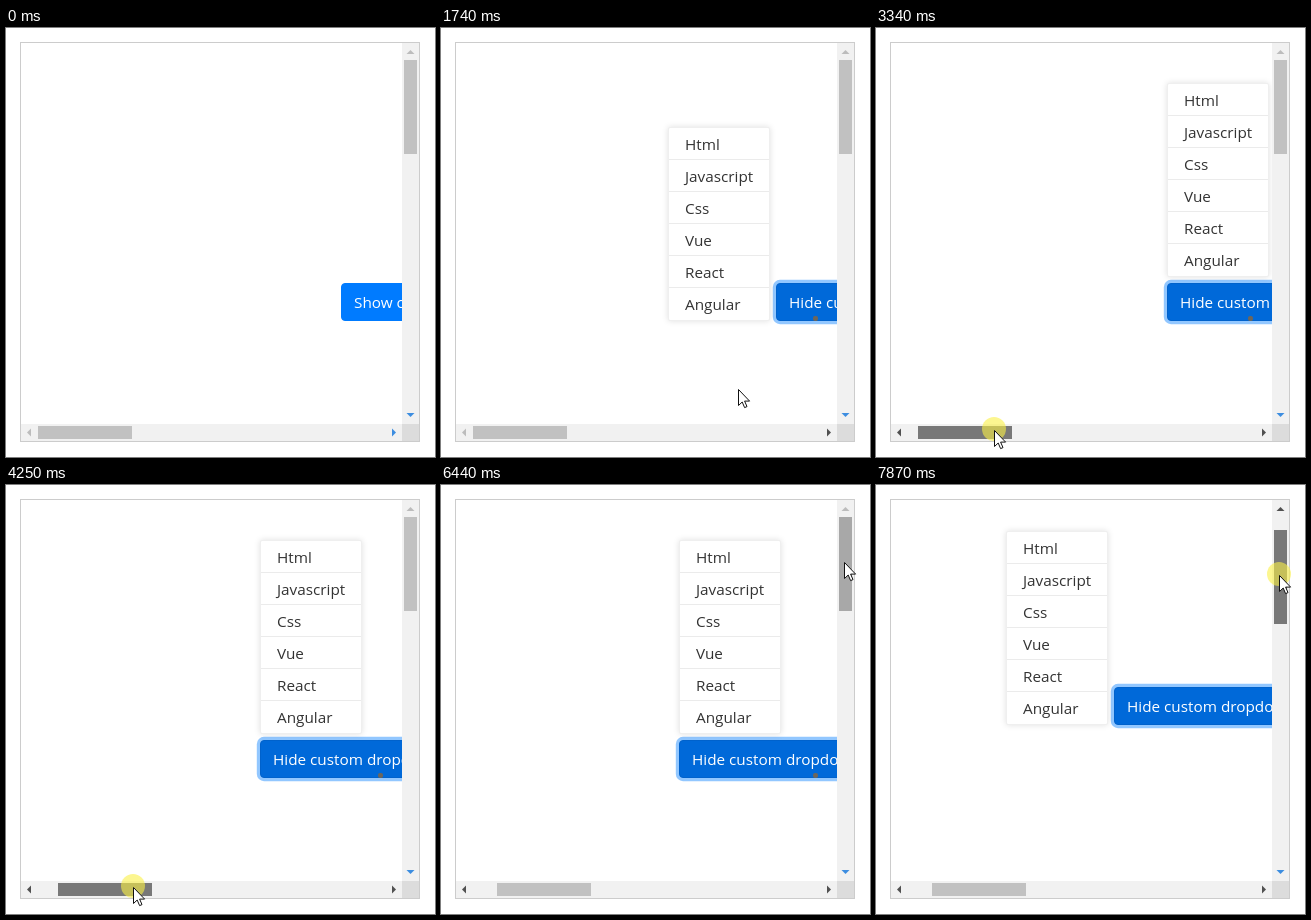
These frames come from a looping animation (429 by 429 pixels, 8 s). An HTML page:

```html
<!DOCTYPE html>
<html lang="en">
<head>
<meta charset="utf-8">
<title>Custom dropdown</title>
<style>
html, body { margin: 0; width: 100%; height: 100%; overflow: hidden; background: #fff; }
#stage { position: relative; width: 429px; height: 429px; overflow: hidden;
  font: 15.3px "Open Sans", "Noto Sans", sans-serif; }
#stage div, #stage svg { position: absolute; box-sizing: border-box; }
#frame { left: 14px; top: 14px; width: 400px; height: 400px; border: 1px solid #ccc; }
#view { inset: 0; clip-path: inset(15px 33px 33px 15px); }
#button { left: 0; top: 0; width: 186px; height: 38px; padding-left: 12px; border-radius: 4px;
  border: 1px solid #007bff; background: #007bff; color: #fff; line-height: 36px; white-space: nowrap; }
#button.hover, #button.focus { border-color: #0062cc; background: #0069d9; }
#button.focus { box-shadow: 0 0 0 3.2px #92c7ff; }
#menu { left: 0; top: 0; width: 102px; height: 194px; border: 1px solid #efefef; border-radius: 2px;
  background: #fff; box-shadow: 0 0 6px rgba(0, 0, 0, .13); color: #333; }
#menu div { position: static; height: 32px; padding-left: 16px; line-height: 32px;
  border-bottom: 1px solid #ebebeb; }
#menu div:last-child { border: 0; }
#spot { left: 372px; top: 288px; width: 5px; height: 5px; border-radius: 2px; background: #6c665c; }
.track { background: #f1f1f1; }
#trackX { left: 15px; top: 396px; width: 381px; height: 17px; }
#trackY { left: 396px; top: 15px; width: 17px; height: 381px; }
#corner { left: 396px; top: 396px; width: 17px; height: 17px; background: #dcdcdc; }
.thumb { background: #c1c1c1; }
.thumb.hover { background: #a8a8a8; }
.thumb.press { background: #787878; }
#thumbX { left: 0; top: 398px; width: 94px; height: 13px; }
#thumbY { left: 398px; top: 0; width: 13px; height: 94px; }
#arrows { left: 0; top: 0; }
#glow { left: -12px; top: -13px; width: 24px; height: 24px; border-radius: 50%;
  background: rgba(250, 240, 70, .6); }
#pointer { left: 0; top: 0; }
#pointer svg { left: -1px; top: -1px; }
</style>
</head>
<body>
<div id="stage">
  <div id="frame"></div>
  <div id="view">
    <div id="button"></div>
    <div id="spot"></div>
    <div id="menu">
      <div>Html</div><div>Javascript</div><div>Css</div>
      <div>Vue</div><div>React</div><div>Angular</div>
    </div>
  </div>
  <div id="trackX" class="track"></div>
  <div id="trackY" class="track"></div>
  <div id="corner"></div>
  <div id="thumbX" class="thumb"></div>
  <div id="thumbY" class="thumb"></div>
  <svg id="arrows" width="429" height="429">
    <path id="left" d="M21 404.5l4-4v8z"/>
    <path id="right" d="M390 404.5l-4-4v8z"/>
    <path id="up" d="M404.5 22l4 4h-8z"/>
    <path id="down" d="M404.5 389l4-4h-8z" fill="#3c8de0"/>
  </svg>
  <div id="pointer">
    <div id="glow"></div>
    <svg width="15" height="22">
      <path d="M1.5 1.5v16l3.7-3.5 2.4 5.6 2.4-1-2.4-5.5h5z" fill="#fff" stroke="#111" stroke-width="1"/>
    </svg>
  </div>
</div>
<script>
const LOOP = 8000;
const RATIO = 4.04; // content pixels per thumb pixel
const ENTER = 200, CLICK = 890, MENU = 1000, GRAB_X = 2620, DROP_X = 5450, GRAB_Y = 6700;

const easeIn = k => k * k;
const smooth = k => k * k * (3 - 2 * k);
const easeOut = power => k => 1 - (1 - k) ** power;
const progress = (t, from, to) => Math.min(1, Math.max(0, (t - from) / (to - from)));

// Free pointer moves between drags
const moves = [
  { from: ENTER, to: 850, x: 374, y: 280, ease: smooth },
  { from: 1400, to: 1740, x: 298, y: 361, ease: easeIn },
  { from: 1740, to: 2450, x: 107, y: 402, ease: easeOut(3) },
  { from: 5480, to: 6370, x: 403, y: 77, ease: smooth },
];

const scrollX = t => Math.round(97.4 * easeOut(2)(progress(t, GRAB_X, 5400)));
const scrollY = t => Math.round(53 * easeOut(1.55)(progress(t, 6900, 7870)));

function pointerAt(t, sx, sy) {
  let x = 384, y = 396;
  // A drag carries the pointer along with the thumb
  for (const m of moves) {
    if (m.from > DROP_X) x += sx / RATIO;
    const k = m.ease(progress(t, m.from, m.to));
    x += (m.x - x) * k;
    y += (m.y - y) * k;
  }
  return [x, y + sy / RATIO].map(Math.round);
}

const el = id => document.getElementById(id);
const place = (id, x, y) => { el(id).style.transform = `translate(${x}px, ${y}px)`; };
const show = (id, on) => { el(id).style.visibility = on ? "visible" : "hidden"; };
const arrow = (id, color) => el(id).setAttribute("fill", color);
const thumbClass = (hover, press) => "thumb" + (press ? " press" : hover ? " hover" : "");

function draw(t) {
  const sx = scrollX(t), sy = scrollY(t);
  const [px, py] = pointerAt(t, sx, sy);
  const bx = 335 - sx, by = 255 - sy;
  const open = t >= CLICK, inside = t >= ENTER;

  el("button").textContent = (open ? "Hide" : "Show") + " custom dropdown";
  el("button").className = open ? "focus" : inside && py < by + 38 ? "hover" : "";
  place("button", bx, by);

  // The menu sits above the button when it fits, otherwise to its left
  const above = sx >= 43 && sy <= 40;
  place("menu", above ? bx : bx - 108, above ? by - 200 : by - 156);
  el("menu").style.opacity = progress(t, MENU, MENU + 200);
  show("spot", t >= 1400 && sy === 0);

  const dragX = t >= GRAB_X && t < DROP_X, dragY = t >= GRAB_Y;
  place("thumbX", 32 + Math.floor(sx / RATIO), 0);
  place("thumbY", 0, 32 + Math.floor(sy / RATIO));
  el("thumbX").className = thumbClass(px < 126 && py >= 398, dragX);
  el("thumbY").className = thumbClass(px >= 398, dragY);
  arrow("left", sx > 0 ? "#505050" : "#bcbcbc");
  arrow("up", sy > 0 ? "#505050" : "#bcbcbc");
  arrow("right", t < 340 ? "#3c8de0" : "#505050");

  place("pointer", px, py);
  show("pointer", inside);
  show("glow", dragX || dragY || (t >= CLICK - 50 && t < CLICK + 140));
}

function tick() {
  draw(performance.now() % LOOP);
  requestAnimationFrame(tick);
}
tick();
</script>
</body>
</html>
```
